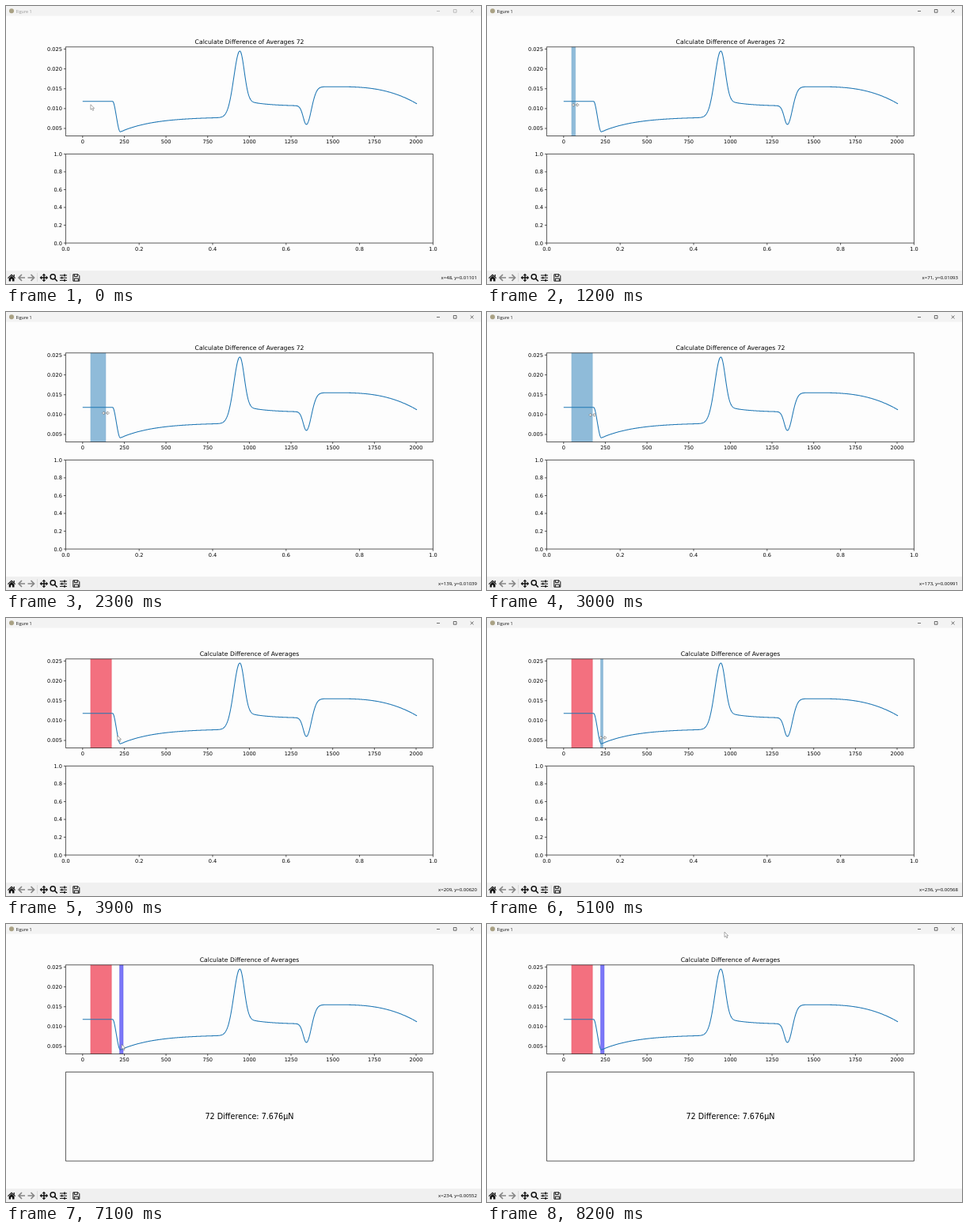
Recreate the animation shown at these times as an HTML page with a canvas. Size 600 by 352 pixels, loop 9 s.

```html
<!DOCTYPE html>
<html lang="en">
<head>
<meta charset="utf-8">
<style>
html, body { margin: 0; width: 600px; height: 352px; overflow: hidden; background: #fff; }
canvas { display: block; }
</style>
</head>
<body>
<canvas id="stage" width="600" height="352"></canvas>
<script>
const g = document.getElementById('stage').getContext('2d');
const PLOT = '"DejaVu Sans", sans-serif', UI = '"Open Sans", sans-serif';
const LEFT = 75.4, WIDTH = 464, TOP = 51.8, LOW = 187.4, HEIGHT = 112.7;
const LOOP = 9000, STEP = 100;

const px = v => 96.8 + v * 0.2106;
const py = v => 54.5 + (0.025 - v) * 5025;
const lerp = (a, b, u) => a + (b - a) * u;
const clamp = u => Math.min(1, Math.max(0, u));
const bell = (x, mid, width) => Math.exp(-(((x - mid) / width) ** 2) / 2);

// Signal: plateau, drop, slow recovery, peak, plateau, dip, hump.
function signal(x) {
  const peak = 943, dip = 1342;
  if (x < peak) {
    const u = clamp((x - 180) / 47), drop = u * u * (3 - 2 * u);
    const recovery = 0.0079 - 0.0038 * Math.exp((225 - x) / 200);
    return lerp(lerp(0.0118, recovery, drop), 0.0245, bell(x, peak, 36));
  }
  if (x < dip) {
    const plateau = 0.0106 + 0.0009 * Math.exp((1030 - x) / 130);
    return lerp(lerp(plateau, 0.0245, bell(x, peak, 26)), 0.006, bell(x, dip, 19));
  }
  const hump = 0.0155 - 0.0043 * clamp((x - 1530) / 475) ** 2.7;
  return lerp(hump, 0.006, bell(x, dip, 30));
}

let signalPath = '';
for (let x = 0; x <= 2005; x += 2.5) signalPath += `${x ? 'L' : 'M'}${px(x)} ${py(signal(x))}`;

// Pointer moves: start, end, then the data position reached.
const home = [48, 0.01101];
const moves = [
  [900, 1700, 109, 0.0108], [1700, 3000, 173, 0.00991],
  [3300, 3900, 209, 0.0062], [3900, 4700, 222, 0.00568], [4900, 5200, 243, 0.00568],
  [7000, 7100, 234, 0.00552], [7300, 8200, 965, 0.03382]
];

function pointer(t) {
  return moves.reduce(([x, y], [start, end, toX, toY]) => {
    const u = clamp((t - start) / (end - start));
    return [lerp(x, toX, u), lerp(y, toY, u)];
  }, home);
}

function text(s, x, y, size, align = 'left', font = PLOT, color = '#000') {
  g.font = size + 'px ' + font;
  g.textAlign = align;
  g.fillStyle = color;
  g.fillText(s, x, y);
}

function box(x, y, w, h, color) {
  g.fillStyle = color;
  g.fillRect(x, y, w, h);
}

function draw(d, color, width) {
  g.strokeStyle = color;
  g.lineWidth = width;
  g.stroke(new Path2D(d));
}

function fill(d, color) {
  g.fillStyle = color;
  g.fill(new Path2D(d));
}

function xTick(x, y, label) {
  draw(`M${x} ${y}v2.5`, '#000', 0.65);
  text(label, x, y + 9.4, 6.6, 'center');
}

function yTick(y, label) {
  draw(`M${LEFT} ${y}h-2.5`, '#000', 0.65);
  text(label, 70.9, y + 2.4, 6.6, 'right');
}

function frame(y) {
  draw(`M${LEFT} ${y}h${WIDTH}v${HEIGHT}h${-WIDTH}z`, '#000', 0.65);
}

function span(from, to, color, edge) {
  const a = px(from), w = px(to) - a;
  box(a, TOP, w, HEIGHT, color);
  draw(`M${a} ${TOP}v${HEIGHT}m${w} 0v${-HEIGHT}`, edge, 0.5);
}

function titleBar(active) {
  const ink = active ? '#111' : '#999';
  box(0, 0, 600, 12.5, '#f3f3f3');
  g.beginPath();
  g.arc(7, 6.3, 3, 0, 7);
  g.fillStyle = '#a9a184';
  g.fill();
  text('Figure 1', 12.5, 8.6, 5.4, 'left', UI, ink);
  draw('M544 6.5h4M565.3 4.5h3.7v3.7h-3.7zM586.7 4.5l3.8 3.8m0-3.8l-3.8 3.8', ink, 0.6);
}

function toolbar() {
  const gray = '#858585', ink = '#111';
  box(0, 335, 600, 17, '#f0f0f0');
  draw('M2.4 344.6L7 340.3l4.6 4.3M10.2 340v2.6', ink, 1.2);
  fill('M3.7 345L7 341.8l3.5 3.2v3.5H8v-2.7H6v2.7H3.7z', ink);
  draw('M24 344h-8M20 340l-4 4 4 4M27.5 344h8M31.5 340l4 4-4 4', gray, 1.7);
  draw('M39.5 338v11M81 338v11', '#d2d2d2', 0.7);
  draw('M44 344h8M48 340v8', ink, 1.4);
  for (let i = 0; i < 4; i++) {
    g.save();
    g.translate(47.9, 344);
    g.rotate(i * Math.PI / 2);
    fill('M-5.3 0l2.6-2.4v4.8z', ink);
    g.restore();
  }
  draw('M62.3 342.8a3.1 3.1 0 1 0-6.2 0a3.1 3.1 0 1 0 6.2 0M61.4 345.1l3.4 3.4', ink, 1.5);
  draw('M68 341h9M68 344.2h9M68 347.4h9', ink, 1);
  draw('M74 339.6v2.8M70.6 342.8v2.8M74 346v2.8', ink, 1.5);
  draw('M84.8 339.8h6.2l1.8 1.8v6.6h-8zM86.3 340v2.6h4V340M86.3 348v-3h5v3', ink, 1);
}

function cursor(x, y, resize) {
  const d = resize
    ? 'M-4.6 0l2.6-2v1.4h1.2v1.2h-1.2V2zM4.6 0l-2.6-2v1.4h-1.2v1.2h1.2V2z'
    : 'M0 0v6.4l1.5-1.3 1.2 2.5 1.2-.6-1.2-2.4h2z';
  g.save();
  g.translate(x, y);
  fill(d, '#fff');
  draw(d, '#666', 0.55);
  g.restore();
}

function upperPlot(t, x) {
  const picked = t >= 3400;
  if (picked) span(48, 173, '#f3707f', '#e8596a');
  else if (t >= 1000) span(48, x, '#8fbbd9', '#84b4d5');
  if (t >= 7100) span(222, 243, '#7b77f8', '#5b55e6');
  else if (t >= 4700) span(222, x, '#8fbbd9', '#78acd0');
  draw(signalPath, '#1f77b4', 1.05);
  frame(TOP);
  for (let v = 0; v <= 2000; v += 250) xTick(px(v), TOP + HEIGHT, v);
  for (let v = 5; v <= 25; v += 5) yTick(py(v / 1000), (v / 1000).toFixed(3));
  text('Calculate Difference of Averages' + (picked ? '' : ' 72'), 307.5, 47.6, 7.68, 'center');
}

function lowerPlot(done) {
  frame(LOW);
  if (done) return text('72 Difference: 7.676µN', 307.5, 246.5, 9.65, 'center');
  for (let v = 0; v <= 5; v++) {
    const label = (v / 5).toFixed(1);
    xTick(LEFT + WIDTH * v / 5, LOW + HEIGHT, label);
    yTick(LOW + HEIGHT * (1 - v / 5), label);
  }
}

function render(t) {
  const [vx, vy] = pointer(t), x = px(vx), y = py(vy);
  const dragging = (t >= 1000 && t < 3400) || (t >= 4700 && t < 7100);
  box(0, 0, 600, 352, '#fdfdfd');
  titleBar(t >= 1000);
  toolbar();
  upperPlot(t, vx);
  lowerPlot(t >= 7100);
  if (y >= TOP) text(`x=${Math.round(vx)}, y=${vy.toFixed(5)}`, 595, 345.7, 6.05, 'right', UI);
  cursor(x, y, dragging);
}

function tick() {
  render(Math.floor(performance.now() % LOOP / STEP) * STEP);
  requestAnimationFrame(tick);
}
tick();
</script>
</body>
</html>
```
